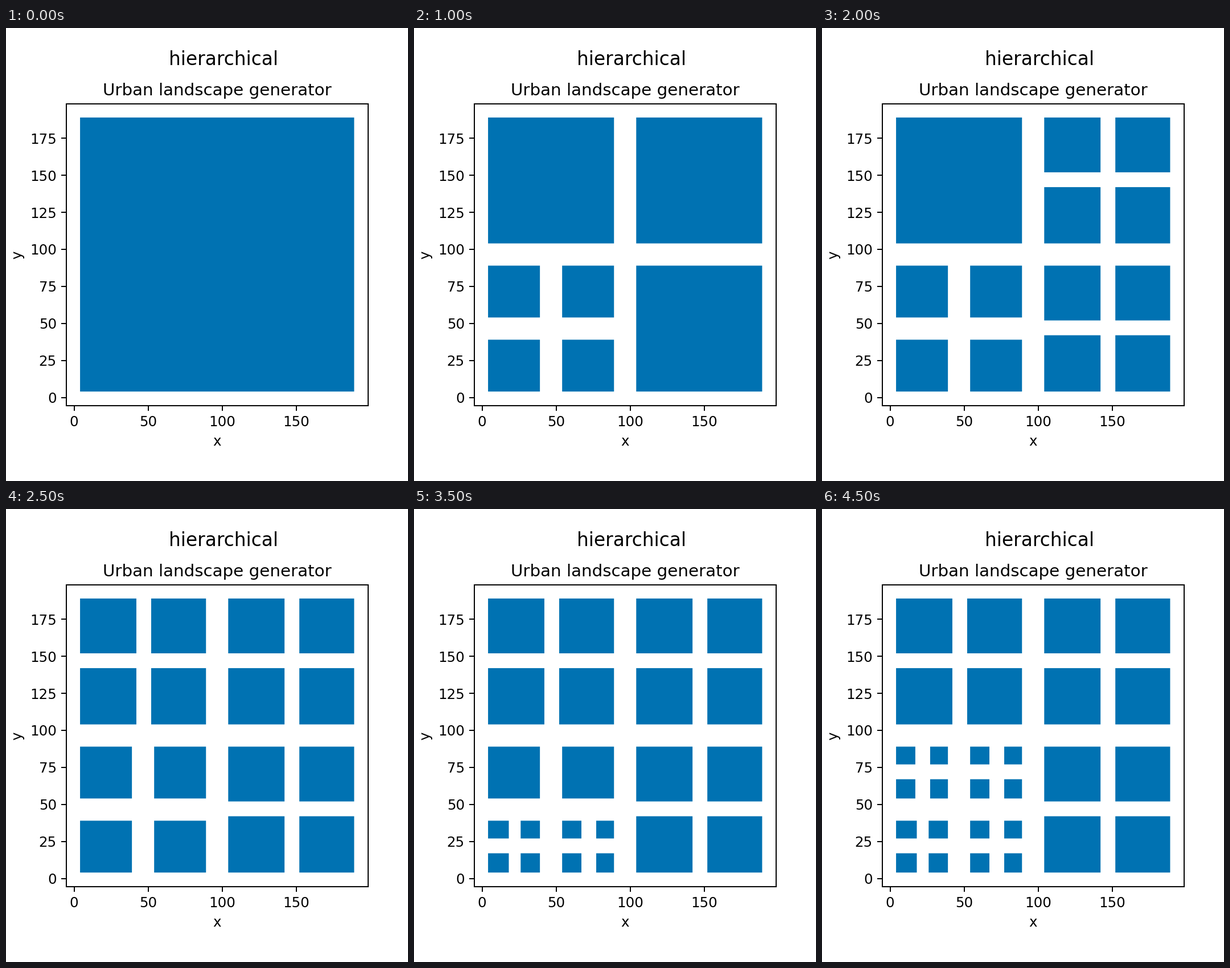
A matplotlib script that plays this animation: 706 px wide and 794 px high, repeating every 5500 ms.

```python
import math

import matplotlib.pyplot as plt
from matplotlib.animation import FuncAnimation
from matplotlib.collections import PolyCollection

W, H, DPI = 706, 794, 176.5
STEP_MS = 500
N_FRAMES = 11
BLUE = "#0072b2"

# Street widths (x, y) for each split, in the order the blocks are cut
STREETS = [(15, 15)] * 2 + [(10, 10)] * 3 + [(8, 10)] + [(10, 10)] * 3


def cut(lo, hi, gap):
    """End of the first half and start of the second, around a street."""
    a = math.ceil((lo + hi - gap) / 2)
    return a, a + gap


def split(block, street):
    """Four blocks, counter-clockwise from the lower left."""
    x0, y0, x1, y1 = block
    xa, xb = cut(x0, x1, street[0])
    ya, yb = cut(y0, y1, street[1])
    return [(x0, y0, xa, ya), (xb, y0, x1, ya),
            (xb, yb, x1, y1), (x0, yb, xa, y1)]


def layout(n_splits):
    """Blocks after cutting the oldest one n_splits times."""
    queue = [(4, 4, 189, 189)]
    for street in STREETS[:n_splits]:
        queue = queue[1:] + split(queue[0], street)
    return queue


def corners(block):
    x0, y0, x1, y1 = block
    return [(x0, y0), (x1, y0), (x1, y1), (x0, y1)]


plt.rcParams["font.family"] = "DejaVu Sans"
# The small extra keeps rounding from losing a pixel
fig = plt.figure(figsize=((W + 0.001) / DPI, (H + 0.001) / DPI), dpi=DPI,
                 facecolor="white")

left, right, top, bottom = 106, 635.5, 133, 662
ax = fig.add_axes([left / W, 1 - bottom / H,
                   (right - left) / W, (bottom - top) / H])
ax.set_xlim(-5.25, 198.25)
ax.set_ylim(-5.55, 198.2)
ax.set_xticks(range(0, 151, 50))
ax.set_yticks(range(0, 176, 25))
ax.set_xlabel("x")
ax.set_ylabel("y")
ax.set_title("Urban landscape generator")
fig.text(382 / W, 1 - 65 / H, "hierarchical", fontsize=13.35,
         ha="center", va="baseline")

blocks = PolyCollection([], facecolors=BLUE, edgecolors="none", linewidths=0)
blocks.set_snap(False)
ax.add_collection(blocks, autolim=False)


def draw(i):
    blocks.set_verts([corners(b) for b in layout(i)])
    return [blocks]


anim = FuncAnimation(fig, draw, frames=N_FRAMES, init_func=lambda: draw(0),
                     interval=STEP_MS, repeat=True, repeat_delay=0, blit=False)
plt.show()
```
